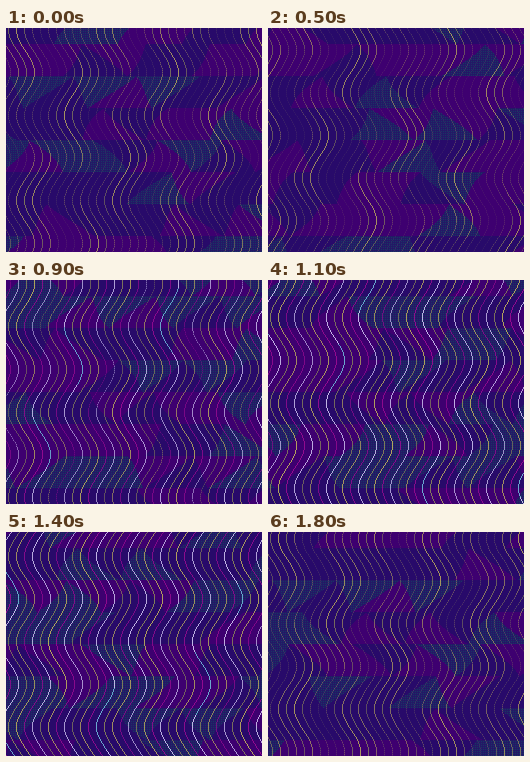
Write an HTML page with a canvas that moves like this. It is 256x224 px and loops after 1.9 s.

```html
<!DOCTYPE html>
<html lang="en">
<head>
<meta charset="utf-8">
<title>Wavy lines</title>
<style>
html, body { margin: 0; width: 100%; height: 100%; overflow: hidden; background: #28086a; }
canvas { display: block; width: 256px; height: 224px; image-rendering: pixelated; }
</style>
</head>
<body>
<canvas id="stage" width="256" height="224"></canvas>
<script>
const W = 256, H = 224, STEPS = 19, STEP_MS = 100, TAU = Math.PI * 2;
const AMPLITUDE = 9, CREST_Y = 44;
const ctx = document.getElementById('stage').getContext('2d');
const image = ctx.createImageData(W, H);

const INDIGO = [40, 10, 106], PURPLE = [62, 0, 112];
const TEAL = [36, 24, 102], TEAL_DOT = [24, 54, 100];
const YELLOW = [190, 174, 92], WHITE = [214, 204, 246];
const OLIVE = [138, 132, 90], MAGENTA = [154, 12, 146], CYAN = [110, 180, 214];
const WARM = [YELLOW, OLIVE, YELLOW, OLIVE];
const COOL = [WHITE, OLIVE, YELLOW, MAGENTA];

const fract = v => v - Math.floor(v);
const mod = (a, n) => ((a % n) + n) % n;
const hash = (a, b, c) => fract(Math.sin(a * 127.1 + b * 311.7 + c * 74.7) * 43758.5453);
const mix = (a, b, k) => a.map((v, i) => v + (b[i] - v) * k);

// Interlocking triangles in 32px bands, each cycling through three tints.
function ground(u, x, y, phase) {
  const band = Math.floor((y + 16) / 32);
  const v = ((y + 16) % 32) / 64;
  const s = u / 64 + hash(band, 3, 1);
  const id = hash(Math.floor(s + v), Math.floor(s - v), band);
  const tint = fract(id + phase);
  if (tint < 0.42) return INDIGO;
  if (tint < 0.76) return PURPLE;
  return y % 2 && x % 2 ? TEAL_DOT : TEAL;
}

// Colours travel along the lines while the whole set brightens and dims.
function line(col, y, phase, base) {
  const glow = 0.58 - 0.24 * Math.cos(TAU * (phase - 0.16));
  const ripple = Math.sin(col * 0.85 + y * 0.012 + TAU * phase)
    * Math.cos(y * 0.022 - col * 0.21 - TAU * phase);
  const level = Math.max(0.12, Math.min(0.95, glow + (1 - glow) * 0.7 * ripple));
  const lively = phase > 0.3 && phase < 0.86;
  const kind = mod(col, 4);
  let color = (lively ? COOL : WARM)[kind];
  if (lively && kind === 0 && ripple > 0.7) color = CYAN;
  return mix(base, color, level < 0.5 && y % 2 ? level * 0.4 : level);
}

function draw(step) {
  const phase = step / STEPS;
  for (let y = 0, p = 0; y < H; y++) {
    const wave = Math.cos(TAU * ((y - CREST_Y) * 3 / 256 + phase));
    const shift = Math.round(AMPLITUDE * wave);
    for (let x = 0; x < W; x++, p += 4) {
      const u = x - shift;
      let color = ground(u, x, y, phase);
      if (mod(u, 8) === 3) color = line(Math.floor(u / 8), y, phase, color);
      image.data.set(color, p);
      image.data[p + 3] = 255;
    }
  }
  ctx.putImageData(image, 0, 0);
}

let shown = -1;
function tick() {
  const step = Math.floor(performance.now() / STEP_MS) % STEPS;
  if (step !== shown) draw(shown = step);
  requestAnimationFrame(tick);
}
tick();
</script>
</body>
</html>
```
